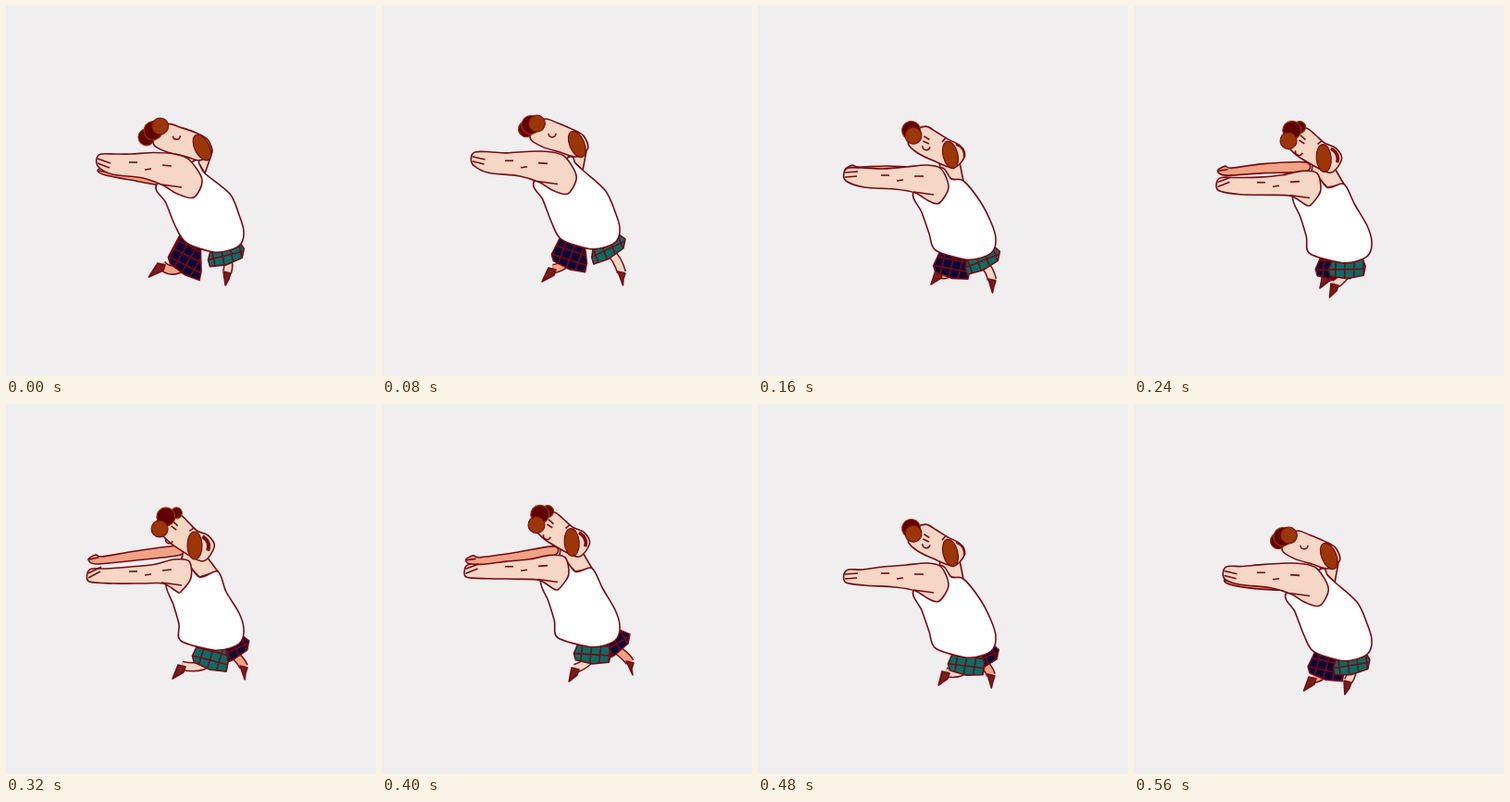
These frames come from a looping animation (400x400 px, 0.64 s). An HTML page with a canvas:

```html
<!DOCTYPE html>
<html lang="en">
<head>
<meta charset="utf-8">
<title>Walk cycle</title>
<style>
html, body { margin: 0; width: 100%; height: 100%; overflow: hidden; background: #f0eeef; }
canvas { display: block; }
</style>
</head>
<body>
<canvas id="stage" width="400" height="400"></canvas>
<script>
const ctx = document.getElementById('stage').getContext('2d');
const STEP = 80, STEPS = 8;
const INK = '#770a12', SKIN = '#f6d6c5', SHADE = '#f0a385', SHOE = '#74201c';
const HAIR = '#9b3706', DARK = '#5e0203', TEAL = '#0a6c66', NAVY = '#0b0638';

// Ankle positions through one stride; hip and spread place the shorts.
const farLeg = {
  cloth: NAVY, skin: SHADE, hip: 226, spread: 19,
  ankles: [[168, 279], [184, 284], [196, 287], [208, 291], [257, 284], [268, 279], [252, 293], [193, 296]]
};
const nearLeg = {
  cloth: TEAL, skin: SKIN, hip: 233, spread: 10,
  ankles: [[239, 288], [259, 288], [253, 296], [217, 301], [190, 283], [209, 286], [203, 290], [231, 300]]
};

function polygon(...pts) {
  const path = new Path2D();
  pts.forEach(p => path.lineTo(...p));
  path.closePath();
  return path;
}

// Closed Catmull-Rom curve through the points.
function blob(...pts) {
  const path = new Path2D(), n = pts.length, tension = .15;
  path.moveTo(...pts[0]);
  pts.forEach((b, i) => {
    const a = pts[(i + n - 1) % n], c = pts[(i + 1) % n], d = pts[(i + 2) % n];
    path.bezierCurveTo(
      b[0] + (c[0] - a[0]) * tension, b[1] + (c[1] - a[1]) * tension,
      c[0] - (d[0] - b[0]) * tension, c[1] - (d[1] - b[1]) * tension, ...c);
  });
  path.closePath();
  return path;
}

function arc(x, y, rx, ry = rx, angle = 0, end = Math.PI * 2) {
  const path = new Path2D();
  path.ellipse(x, y, rx, ry, angle, 0, end);
  return path;
}

function stroke(path, color = INK, width = 1.6) {
  ctx.strokeStyle = color;
  ctx.lineWidth = width;
  ctx.stroke(path);
}

function paint(path, fill, outline, width) {
  ctx.fillStyle = fill;
  ctx.fill(path);
  stroke(path, outline, width);
}

function line(x1, y1, x2, y2) {
  const path = new Path2D();
  path.moveTo(x1, y1);
  path.lineTo(x2, y2);
  stroke(path);
}

function drawShorts(cloth, x, hemX, hemY, tilt) {
  const dx = 20 * Math.cos(tilt), dy = 20 * Math.sin(tilt);
  const shape = polygon([x - 11, 252], [x + 11, 252], [hemX + dx, hemY + dy - 10],
    [hemX + dx - 2, hemY + dy], [hemX, hemY + 3], [hemX - dx + 2, hemY - dy], [hemX - dx, hemY - dy - 7]);
  paint(shape, cloth);
  ctx.save();
  ctx.clip(shape);
  ctx.translate(hemX, hemY);
  ctx.rotate(tilt);
  for (let d = -45; d <= 45; d += 10) {
    line(d + 5, -50, d, 50);
    line(-50, d - 2, 50, d - 2);
  }
  ctx.restore();
}

function drawLeg({ cloth, skin, hip, spread, ankles }, step, bounce) {
  const x = ankles[step][0], y = ankles[step][1] - bounce;
  const lean = (x - 225) / 40;
  const hipX = hip + spread * lean, hemX = hipX + 4 * lean, hemY = 283 - 6 * lean;

  const shin = new Path2D();
  shin.moveTo(hemX, hemY - 6);
  shin.quadraticCurveTo(hemX + 12 * lean, hemY + 3, x, y);
  stroke(shin, INK, 10.5);
  stroke(shin, skin, 7.5);
  paint(polygon([x - 4, y - 1], [x + 4, y + 1], [x + 2, y + 7], [x + (x - 250) / 6, y + 14]), SHOE);
  drawShorts(cloth, hipX, hemX, hemY, -.1 - .4 * lean);
}

function drawFarArm(c, s, hand) {
  const y = hand.y - 3 + 14 * c - 2 * s, elbow = 178 + 10 * c - 4 * s;
  const endX = 177 - 12 * c, endY = 178 + 15 * c;
  paint(blob([hand.x + 1, y], [hand.x + 9, y - 5], [hand.x + 16, y - 3], [140, elbow - 5],
    [endX, endY - 6], [endX, endY + 4], [140, elbow + 5], [hand.x + 10, y + 5]), SHADE);
  line(hand.x + 2, y, hand.x + 12, y + 2 * c);
}

function drawTorso(c, head) {
  const front = [197 + 7 * c, 171], dip = [209, 183 - 8 * c], back = [222 - 7 * c, 185];
  paint(polygon(front, dip, back, [head.x + 10, head.y + 8], [head.x - 12, head.y + 5]), SKIN);
  paint(blob(front, dip, back, [240 + 2 * c, 207], [252, 230], [257, 247], [254, 261], [242, 268],
    [224, 270], [192 + 3 * c, 260], [185 - 2 * c, 242], [177 - 4 * c, 219 - 2 * c], [168 - 5 * c, 197]), '#fff');
}

// The head pivots at the sideburn; c is 1 when it is thrown back, -1 when dropped.
function drawHead(c, head) {
  ctx.save();
  ctx.translate(head.x, head.y);
  ctx.rotate((32 - 13 * c) * Math.PI / 180);
  const long = 1 + .12 * c;
  const at = (x, y) => [x * long, y];
  paint(blob(at(-45, 14), at(-48, 0), at(-39, -12), at(-26, -13), at(-11, -13), [3, -14 + 4 * c],
    [14 - 2 * c, -6 + 8 * c], [10 - 8 * c, 10 + 4 * c], at(-12, 15), at(-31, 17)), SKIN);
  paint(arc(0, 0, 8, 15, -.8), HAIR, INK, 1.2);
  stroke(arc(-27 * long, 6 - 9 * c, 4, 4, -.4, Math.PI));
  if (c < .5) {
    line(-35, -2, -28, -2);
    line(-33, 3, -26, 2);
    line(-14, -13, -15, -7);
    const nape = new Path2D();
    nape.moveTo(-1, -13);
    nape.quadraticCurveTo(10, -15, 14, -6);
    stroke(nape, INK, 2.5 - 1.5 * c);
  }
  // The curls roll around the crown as the head tips.
  paint(arc(...at(-49 - 5 * c, -1 + 10 * c), 7.5 + 1.5 * c), DARK, HAIR, 1.1);
  paint(arc(...at(-50, 0), 10), DARK, HAIR, 1.1);
  paint(arc(...at(-45, 3.5 - 10.5 * c), 9), HAIR, INK, 1.1);
  ctx.restore();
}

function drawNearArm(c, { x, y }) {
  paint(blob([x, y - 2], [x + 5, y - 7], [x + 20, y - 7], [135, 172 - 8 * c], [160, 170 - 7.5 * c],
    [182, 168 - 4 * c], [198, 172 - 2 * c], [206 + 6 * c, 192], [196 + 7 * c, 209 + 2 * c],
    [185, 207], [170, 198], [148, 194 - 4 * c], [115, 192 - 6 * c], [x + 2, y + 7]), SKIN);
  line(x + 1, y - 2, x + 15, y - 3 + 6 * c);
  line(x + 1, y + 3, x + 14, y + 2 + 6 * c);
  line(133, 179 - 6 * c, 142, 179 - 6 * c);
  line(150, 185 - 4 * c, 157, 184 - 4 * c);
  line(169, 180 - 4 * c, 179, 180 - 3 * c);
  line(168, 197, 190, 200);
}

function draw(step) {
  const phase = step / STEPS * Math.PI * 2;
  const c = Math.cos(phase), s = Math.sin(phase);
  const bounce = -4 * Math.cos(2 * phase) - 7.5 * Math.sin(2 * phase);
  const hand = { x: 93 + 5 * c, y: 180 - 9 * c - 2 * s };
  const head = { x: 208 + 4 * c, y: 157 };

  ctx.fillStyle = '#f0eeef';
  ctx.fillRect(0, 0, 400, 400);
  ctx.save();
  ctx.translate(0, bounce);
  drawFarArm(c, s, hand);
  drawLeg(farLeg, step, bounce);
  drawLeg(nearLeg, step, bounce);
  drawTorso(c, head);
  drawHead(c, head);
  drawNearArm(c, hand);
  ctx.restore();
}

ctx.lineJoin = 'round';
const start = performance.now();
function tick() {
  draw(Math.floor((performance.now() - start) / STEP) % STEPS);
  requestAnimationFrame(tick);
}
tick();
</script>
</body>
</html>
```
